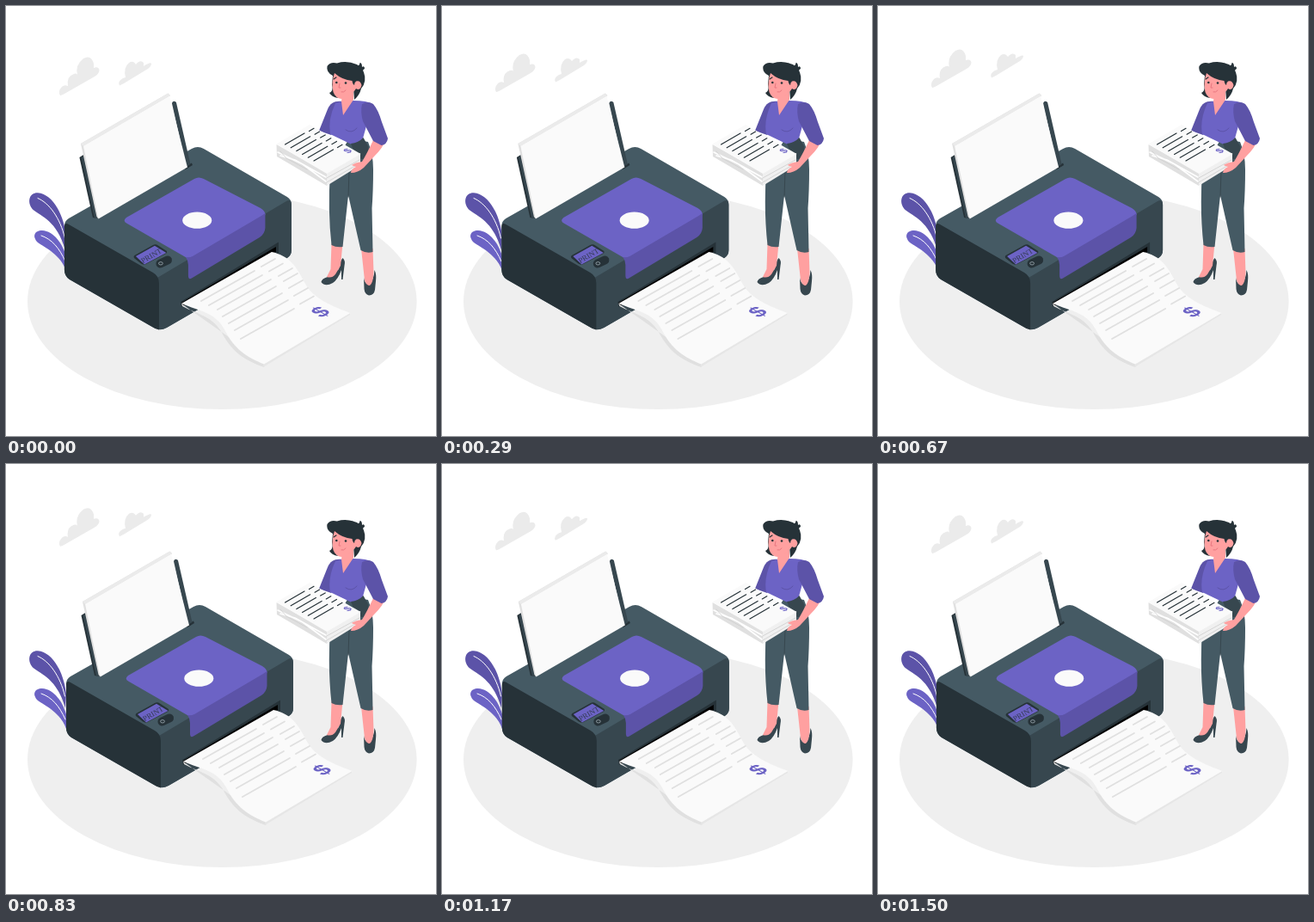
An HTML page that plays this animation: 500x500 px, repeating every 1540 ms.

```html
<!DOCTYPE html>
<html lang="en">
<head>
<meta charset="utf-8">
<title>Printing</title>
<style>
html, body { margin: 0; width: 100%; height: 100%; overflow: hidden; background: #fff; }
svg { display: block; width: 100vw; height: 100vh; }
.top { fill: #455a64; } .mid { fill: #37474f; } .dark { fill: #263238; }
.violet { fill: #6c63c5; } .plum { fill: #5c53a8; }
.paper { fill: #fafafa; } .edge { fill: #e0e0e0; } .cloud { fill: #ebebeb; }
.skin { fill: #ffa0a0; }
.line { fill: none; stroke-linecap: round; stroke-linejoin: round; }
text { font-family: "Liberation Sans", Arial, sans-serif; }
</style>
</head>
<body>
<svg viewBox="0 0 500 500" xmlns="http://www.w3.org/2000/svg">
  <ellipse cx="251.3" cy="343.5" rx="226.3" ry="125.6" fill="#efefef"/>

  <g id="clouds" class="cloud">
    <path d="M63 104Q60 99 65 94Q68 91 72 93Q70 82 79 79Q82 78 83 80Q80 69 90 61Q99 56 102 67V72Q108 70 108.500 75Q108 79 103 82L68 102Q64 104 63 104Z"/>
    <path d="M132 92.500Q129 88 136 84L139 83Q136 72 143 66Q148 63 151 68Q156 62 160 66V70Q168 65 169 67Q169 70 165 73L137 90Z"/>
  </g>

  <g id="plant">
    <path class="plum" d="M70 268C68 246 56 219 37 217.300C27 217 24 228 31 236.500C41 245 59 249 69 284Z"/>
    <path class="violet" d="M70 308C64 290 46 281 37 275C30 268 33 261 42 261C56 262 66 276 71 294Z"/>
    <path class="line" stroke="#fff" d="M37 223.500C50 229 63 246 68.500 270M41 267C53 271 62 281 69 297"/>
  </g>

  <g id="printer">
    <path class="top" d="M68 256Q68 250 73 247L216 166Q223 162 230 166L327 222Q332 225 332 231V284Q332 290 327 293L187 374Q178 378 170 373L74 318Q68 314 68 307Z"/>
    <path class="mid" d="M176 316L326 227Q332 224 332 231V284Q332 290 327 293L187 374Q182 377 177 376Z"/>
    <path class="dark" d="M68 257Q68 251 73 254L171 310Q178 314 178 322V376.500Q174 376 170 373L74 318Q68 314 68 307Z"/>

    <path class="dark" d="M85.500 176L91 172.500L107 247L101 246Z"/>
    <path class="mid" d="M87.500 176L90 175L106 247H103Z"/>
    <path class="dark" d="M207 188L216 182.500L217 185L209 190Z"/>
    <path class="mid" d="M193 113Q194.500 109 198 112L214.500 184L209.500 187Z"/>
    <path class="edge" d="M87 160L188.500 101.500L191 104L107 247L105.500 245Z"/>
    <path class="paper" d="M90 162.500L190 104.500L211 187.500L107.500 247.500Z"/>
    <path fill="#ebebeb" d="M87 160L188.500 101.500L190.500 104.500L90 163Z"/>

    <path class="violet" d="M140 246L219 201Q224 198 230 201L296 235Q301.500 238 301.500 243L214 295L141 253Q135 250 140 246Z"/>
    <path class="plum" d="M301.500 241V258Q301 265 295 269L216 316.500Q212 319 212 313V301Q212 296 209 292Q213 293 217 291L297 244Z"/>
    <ellipse cx="222.300" cy="249.200" rx="17" ry="9.600" fill="#fafafa"/>

    <path class="dark" d="M149.500 290L171 278Q174 276.500 177 278.500L187 285Q188 287 186 288L163 300Q160 301.500 157 299.500L149 293Q148 291 149.500 290Z"/>
    <path class="violet" d="M151 291L173 278.800L186.500 287L161 300.500Z"/>
    <text transform="matrix(.87 -.5 .52 .82 159.300 299.300)" font-size="9" class="dark" opacity=".8" style="font-family:'Liberation Serif',serif">PRINT</text>
    <path class="line" stroke="#263238" stroke-width="10" d="M179.500 299.500L188 295.500"/>
    <ellipse cx="180" cy="299.300" rx="2.400" ry="1.700" fill="none" stroke="#b0bec5" stroke-width=".7"/>

    <path class="dark" d="M203 344L317 274.500V290L204 350Z"/>
    <path d="M204 345L314 280V286L205 349Z"/>
    <path class="edge" d="M204 346L205 349C224 359 238 360 250 378C263 403 278 412 300 420L303 416Z"/>
    <path fill="#e6e6e6" d="M299 420L400 359V356.500L300 416Z"/>
    <path class="paper" d="M204 346L309 286C329 290 338 303 347 321C357 341 380 349 400.500 357L300 416.500C280 408 266 400 254 376C243 356 226 355 204 346Z"/>
    <g id="bill"></g>
    <text transform="matrix(.866 -.5 .866 .5 365.500 355.500)" y="8.200" text-anchor="middle" font-size="24" font-weight="700" class="violet">$</text>
  </g>

  <g id="woman">
    <path class="plum" d="M391 111C382 110 377 113 374 120L364 145L378 150L388 135Z"/>
    <path class="mid" d="M366.500 321Q367 317 374 315L387 306Q388 297 391.500 293Q395 296 393.500 302L391.500 318H390V307Q386 318 380 322Q371 327 366.500 321Z"/>
    <path class="mid" d="M416 316Q417 323 422 324Q428 318 428.500 307Q431 312 430 320L429 330Q428 336 422 336.500Q417 335 416.500 329Z"/>
    <path class="skin" d="M378.500 276L377.500 306Q375 311 373 315Q379 317 383 312L389 302L391.500 276ZM413 282L417 319Q419 325 423 325Q427 322 427.500 310L426.500 282Z"/>
    <path class="top" d="M399 154L421 158Q427 172 427 190Q427 215 425.500 235Q426 260 426.500 286Q419 288 412.500 284L398 220L391.500 280Q384 281 378.500 278Q374 238 377 192Z"/>
    <path class="line" stroke="#37474f" d="M399 193L398 222"/>
    <path class="violet" d="M390 111L383 113Q374 132 377 149L402 161Q414 157 415 154L426 114Q420 110 404 110Z"/>
    <path class="mid" d="M401 160Q410 159 415.500 153L421 163L422 179L408 177Z"/>
    <path class="line" stroke="#5c53a8" d="M395 144Q402 149 408 142"/>
    <path class="skin" d="M390 111L391 101L404 99V109L392 127Z"/>
    <path class="dark" d="M373.500 70Q377 64.500 385 66.500Q396 63 408 68Q411 71 411.500 66Q414 66 414 71Q417 69 417 73Q414 74 416 77Q420 88 413 96Q411 104 405 109L404 95L383 97L386 107Q379 106 376 101Q381 99 379 91L380 81Q372 77 373.500 70Z"/>
    <path class="skin" d="M382 78Q378 88 380.500 100Q383 107 390 108Q397 107 403 101Q406 98 407 96Q412 99 413.500 92Q412 86 407 87.500Q405 89 405 92Q403 91 402.500 87Q391 86 382 78Z"/>
    <circle cx="384.300" cy="89" r="1.300" class="dark"/>
    <circle cx="395" cy="89.500" r="1.300" class="dark"/>
    <path class="line" stroke="#263238" stroke-width="1.200" d="M381 85L384 83"/>
    <path class="line" stroke="#e87780" d="M388 90L387 95L389 95M390 100Q393 101 395 98"/>

    <g id="stack">
      <path class="edge" d="M314.500 161L373 194V209L315 175Z"/>
      <path fill="#f0f0f0" d="M373 194L412 171V185L373 209Z"/>
      <path class="paper" d="M314.500 160.500L353 138L412.500 172L373 195Z"/>
      <path class="line" stroke="#fff" stroke-width="1.600" d="M316 170L345 184L372 204M319 174L336 179L372 199"/>
      <path class="line" stroke="#cfcfcf" stroke-width=".8" d="M319 169L326 177L350 190M373 200L411 179M373 205L411 183"/>
      <g id="sheet"></g>
      <text transform="matrix(.866 -.5 .866 .5 397 168.300)" y="3.800" text-anchor="middle" font-size="11" font-weight="700" class="violet">$</text>
    </g>

    <path class="skin" d="M427 156L440 158Q439 164 428 175L416 188Q409 194 401 194Q401 190 407 187Q404 186 402 185Q406 182 414 181Q420 171 427 156Z"/>
    <path class="plum" d="M414 114Q421 110 427 114Q433 121 437 135L444 154Q443 161 436.500 162L427 157L415 134Q412 123 414 114Z"/>
  </g>
</svg>
<script>
const $ = id => document.getElementById(id);

function rule(id, points, [dx, dy], color, width) {
  const d = points.map(([x, y]) => `M${x} ${y}l${dx} ${dy}`).join("");
  $(id).insertAdjacentHTML("beforeend",
    `<path class="line" d="${d}" stroke="${color}" stroke-width="${width}"/>`);
}
const row = (count, x, y, dx, dy) =>
  Array.from({ length: count }, (_, i) => [x + i * dx, y + i * dy]);

rule("bill", [[227, 343], [236, 348], [246, 353], [252, 361], [259, 369], [266, 377], [273, 387]],
  [62, -35], "#e0e0e0", 1.8);
rule("bill", [[297, 303], [306, 308.5], [317, 314], [323, 320], [329, 328], [335, 337], [342, 346.5]],
  [16, -9], "#e0e0e0", 1.8);
rule("sheet", row(6, 324.5, 161, 6.7, 3.8), [22.5, -13], "#263238", 1.2);
rule("sheet", row(6, 352.5, 145.5, 6.6, 3.8), [5.5, -3.2], "#263238", 1.2);

const LOOP = 1540, CYCLE = 1500, FRAME = 1000 / 24, LEAD = 27;
const SHAKE = [0, -1, 2, -4, 4, -4, 4, -4, 2, -1, 0];

function shake(p) {
  const i = Math.floor(p * 10), k = p * 10 - i;
  return SHAKE[i] + (SHAKE[i + 1] - SHAKE[i]) * k;
}
const lift = p => -10 * (1 - Math.abs(2 * p - 1));

function draw(now) {
  const t = now % LOOP;
  const step = Math.min(36, Math.floor((t + 6) / FRAME));
  const p = ((step * FRAME + LEAD) % CYCLE) / CYCLE;
  $("printer").setAttribute("transform", `translate(${shake(p) + 0.1} 0)`);
  $("clouds").setAttribute("transform", `translate(0 ${lift(p) + 0.3})`);
}

let start;
function tick(now) {
  start ??= now;
  draw(now - start);
  requestAnimationFrame(tick);
}
draw(0);
requestAnimationFrame(tick);
</script>
</body>
</html>
```
